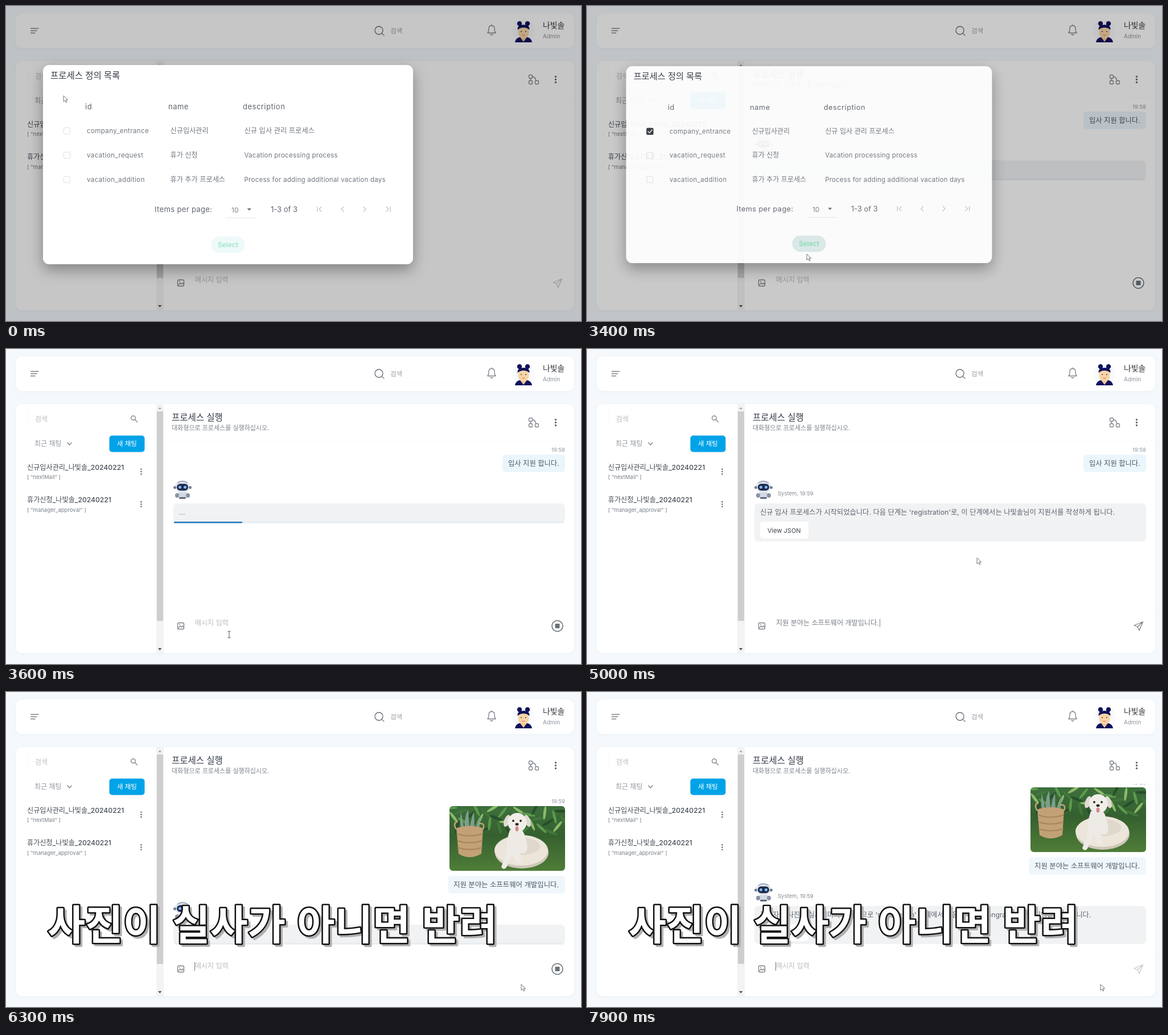
An HTML page that plays this animation: 1010x555 px, repeating every 8000 ms.

```html
<!DOCTYPE html>
<html lang="ko">
<head>
<meta charset="utf-8">
<title>Process chat</title>
<style>
html, body { margin: 0; width: 100%; height: 100%; overflow: hidden; background: #f5f9fc; }
svg { display: block; width: 1010px; height: 555px; }
text { font-family: Inter, "Noto Sans CJK KR", "Noto Sans CJK", sans-serif; white-space: pre; }
.caption { font-family: "Noto Sans CJK KR", "Noto Sans CJK", sans-serif; font-size: 72.1px; font-weight: 700; stroke-linejoin: round; }
.line { fill: none; stroke: #7b8188; stroke-width: 1.3; stroke-linecap: round; stroke-linejoin: round; }
</style>
</head>
<body>
<svg id="stage" viewBox="0 0 1010 555" xmlns="http://www.w3.org/2000/svg"></svg>
<script>
const LOOP = 8000;
const PERSON = '나빛솔';
const TYPED = '지원 분야는 소프트웨어 개발입니다.';
const TIMES = { check: 2600, select: 3300, close: 3380, reply: 4100, typing: 4300, typed: 4900,
  send: 5600, caption: 5900, reject: 7200 };

const text = (x, y, s, size, fill, extra = '') =>
  `<text x="${x}" y="${y}" font-size="${size}" fill="${fill}" ${extra}>${s}</text>`;
const rect = (x, y, w, h, r, fill, extra = '') =>
  `<rect x="${x}" y="${y}" width="${w}" height="${h}" rx="${r}" fill="${fill}" ${extra}/>`;
const circle = (x, y, r, fill, extra = '') => `<circle cx="${x}" cy="${y}" r="${r}" fill="${fill}" ${extra}/>`;
const ellipse = (x, y, rx, ry, fill, extra = '') =>
  `<ellipse cx="${x}" cy="${y}" rx="${rx}" ry="${ry}" fill="${fill}" ${extra}/>`;
const path = (d, fill, extra = '') => `<path d="${d}" fill="${fill}" ${extra}/>`;
const line = (d, extra = '') => `<path class="line" d="${d}" ${extra}/>`;
const group = (id, body, extra = '') => `<g id="${id}" ${extra}>${body}</g>`;
const dots = (x, y, gap, r) => [-1, 0, 1].map(i => circle(x, y + i * gap, r, '#666b72')).join('');
const END = 'text-anchor="end"', MEDIUM = 'font-weight="500"';

const avatar = circle(909, 44, 19.5, '#f8fafc')
  + circle(902, 31, 4.2, '#10125c') + circle(916, 31, 4.2, '#10125c')
  + path('M894 64Q895 57 902 55H916Q923 57 924 64Z', '#10125c')
  + path('M903 55H915L909 63Z', '#f3c795')
  + rect(899.5, 36, 19, 20, 8, '#f8d5a7')
  + path('M898.5 42Q898 33 909 33T919.5 42Q915 38 909 38T898.5 42Z', '#10125c')
  + circle(905, 45, .9, '#333') + circle(913, 45, .9, '#333')
  + path('M906.5 51Q909 53 911.5 51', 'none', 'stroke="#c86b55"');

const header = rect(17, 13, 981, 61, 12, '#fff', 'filter="url(#soft)"')
  + line('M43.5 39.5H57M43.5 43.5H54M43.5 47.5H51', 'stroke-width="1"')
  + circle(655, 43, 7, 'none', 'stroke="#666c74" stroke-width="1.3"') + line('M660.5 48.5L664 52')
  + text(675, 48, '검색', 11.5, '#9a9fa6') + rect(645, 59, 160, 1, 0, '#fafbfb')
  + line('M846 47.5Q848 45 848 40Q848 34.5 853 34.5T858 40Q858 45 860 47.5ZM851 50Q853 52 855 50M853 33V34')
  + avatar + text(943, 38.5, PERSON, 13.8, '#30353d', MEDIUM) + text(943, 57, 'Admin', 10, '#8d939b');

const chatItem = (y, title, step) => text(37, y, `${title}_${PERSON}_20240221`, 12.15, '#444b55', MEDIUM)
  + text(37, y + 16.5, `[ "${step}" ]`, 9.5, '#7a8189') + dots(237.5, y + 3.5, 4.2, 1.3);

const sidebar = path('M38 107V138', 'none', 'stroke="#f6f7f8"')
  + text(51, 128, '검색', 12, '#b9bdc3')
  + circle(223.5, 121.5, 3.8, 'none', 'stroke="#8a9097" stroke-width="1.5"') + line('M226.5 124.5L230.5 128.5')
  + text(50, 171, '최근 채팅', 12, '#9398a0') + line('M108 165L111.5 169L115 165')
  + rect(181.5, 152.5, 62, 29, 5, '#03a3e8', 'filter="url(#soft)"') + text(212.5, 171, '새 채팅', 11.5, '#fff', 'font-weight="500" text-anchor="middle"')
  + chatItem(212.5, '신규입사관리', 'nextMail') + chatItem(270, '휴가신청', 'manager_approval')
  + rect(264, 97, 13, 439, 0, '#f3f3f4') + rect(265, 110, 11, 369, 0, '#cecece')
  + path('M267.5 106L270.3 102.5L273 106Z', '#a5a5a5') + path('M267 527L270.2 531L273.5 527Z', '#555');

const chatFrame = text(291, 126, '프로세스 실행', 15.5, '#333b46', MEDIUM)
  + text(291, 143, '대화형으로 프로세스를 실행하십시오.', 11, '#7b828b')
  + line('M921.5 127V132M924.5 124.5Q930 125 930.5 131')
  + [[918.5, 121.5], [918.5, 131.5], [929.5, 131.5]].map(([x, y]) =>
    rect(x, y, 6, 6, 2, '#fff', 'stroke="#7b8188" stroke-width="1.3"')).join('')
  + dots(965.5, 129.5, 5, 1.7)
  + rect(278, 162, 720, 1, 0, '#f9fafb') + rect(278, 468, 720, 1, 0, '#fbfcfc')
  + rect(301.5, 482.5, 11, 11, 2, 'none', 'stroke="#7b8188" stroke-width="1.3"')
  + line('M303 491L306 488L308 490L310 488L312 490') + circle(305, 485.5, .9, '#7b8188')
  + text(332, 487, '메시지 입력', 12, '#b7bbc1', 'id="placeholder"') + text(332, 487, '', 12.1, '#777d85', 'id="typed"')
  + rect(331, 476, 1, 15, 0, '#777', 'id="caret"')
  + group('plane', line('M961 487L976.5 480.5L970 496L967 489.5ZM967 489.5L976 481'))
  + group('stop', circle(968.5, 488, 9.5, 'none', 'stroke="#6a7077" stroke-width="1.6"') + rect(964.5, 484, 8, 8, 1, '#6a7077'));

const robot = ellipse(310, 257, 9, 6.5, '#d3d9e2') + ellipse(300.5, 258, 3.5, 4, '#8993a4') + ellipse(319.5, 258, 3.5, 4, '#8993a4')
  + rect(304, 261, 12, 3, 1.5, '#5d687c')
  + ellipse(310, 242.5, 13.5, 11, '#e4e8ef') + circle(296.5, 244, 2.5, '#6f7d95') + circle(323.5, 244, 2.5, '#6f7d95')
  + rect(300, 237.5, 20, 12, 6, '#1d2b4b') + circle(305.5, 243.5, 2.5, '#86b8ff') + circle(314.5, 243.5, 2.5, '#86b8ff')
  + path('M301 236Q310 230 319 236', 'none', 'stroke="#8b99af" stroke-width="1.5"');

const answer = (id, message, size) => group(id, robot
  + group(id + 'Wait', rect(294, 272, 688, 35, 7, '#f0f2f4') + text(304, 292, '...', 12, '#777d85')
    + rect(296, 304.5, 684, 2, 1, '#e6ebf0') + rect(295, 304, 0, 3, 1, '#3989cb', `id="${id}Bar"`))
  + group(id + 'Done', text(335, 258, 'System, 19:59', 9.5, '#858b93') + rect(294, 272, 688, 67, 7, '#f0f2f4')
    + text(304, 291.5, message, size, '#5d646d') + rect(304, 304, 85, 30, 5, '#fff') + text(317, 323.5, 'View JSON', 11, '#3b4149')));

// Leaf fans around the top edge of the picture
const leaves = Array.from({ length: 36 }, (_, i) => {
  const x = 781 + i * 5.7, y = 204 + (i * 17) % 44;
  return ellipse(x, y, 12, 2.5, ['#5c9a4c', '#8dba68', '#284f2b', '#43763b'][i % 4], `transform="rotate(${i * 53} ${x} ${y})"`);
}).join('');
const photo = `<g clip-path="url(#photoClip)">` + rect(779, 201, 203, 114, 0, 'url(#grass)') + leaves
  + path('M800 248Q796 225 799 212L806 246Q804 220 812 207L814 246Q817 220 822 211L823 246Q829 225 835 216L830 248Z', '#7d9f8c')
  + path('M791 240Q814 232 838 240L835 285Q814 297 795 285Z', '#c3a177')
  + [250, 262, 274].map(y => path(`M793 ${y}Q814 ${y + 7} 837 ${y}`, 'none', 'stroke="#a98558" stroke-width="2"')).join('')
  + path('M791 242Q784 231 793 228M838 242Q842 230 831 232', 'none', 'stroke="#c3a177" stroke-width="2.5"')
  + ellipse(906, 283, 47, 28, '#cfc7b8') + ellipse(905, 279, 47, 27, '#ebe5da') + ellipse(908, 272, 30, 15, '#e0d8ca')
  + path('M885 243Q877 268 879 285L870 308Q874 315 879 309L890 284L896 300Q902 304 905 299L903 284Q918 287 915 267Q912 250 906 243Z', '#eeebe6')
  + ellipse(880, 227, 5, 11, '#dfdad2', 'transform="rotate(20 880 227)"') + ellipse(916, 227, 5, 11, '#dfdad2', 'transform="rotate(-20 916 227)"')
  + ellipse(898, 230, 16.5, 17, '#f1eeea') + circle(891, 227, 1.9, '#28231f') + circle(904, 227, 1.9, '#28231f')
  + ellipse(897.5, 233, 3, 2.3, '#28231f') + ellipse(897.5, 241, 3, 4.5, '#d48a8c') + '</g>';

const messages = group('first', text(982, 181, '19:58', 9.5, '#9398a0', END)
    + rect(872, 186, 110, 31, 6, '#ebf5fc') + text(882, 206, '입사 지원 합니다.', 12.3, '#4d5661')
    + answer('start', `신규 입사 프로세스가 시작되었습니다. 다음 단계는 'registration'로, 이 단계에서는 ${PERSON}님이 지원서를 작성하게 됩니다.`, 12.3))
  + group('second', text(982, 195.5, '19:59', 9.5, '#9398a0', END) + photo
    + rect(776, 324, 206, 31, 6, '#eff7fc') + text(786, 343.5, TYPED, 12.4, '#4d5661')
    + `<g transform="translate(0 138)">` + answer('verdict', "지원자의 사진이 실사이미지가 아니므로 'registration' 단계에서 다음 단계인 'congratulate'로 진행할 수 없습니다.", 12.1) + '</g>');

const GREY = '#70767f';
const row = (y, id, name, about, ko) => rect(101.5, y - 9.5, 11, 11, 1, '#fff', 'stroke="#dedfe1"')
  + text(142, y, id, 11.5, GREY, 'letter-spacing=".4"') + text(288.5, y, name, 12.2, GREY)
  + text(418.5, y, about, ko ? 12.3 : 11.5, GREY, ko ? '' : 'letter-spacing=".26"');
const pager = [[552, 1, 1], [591, 1, 0], [630, -1, 0], [670, -1, 1]].map(([x, dir, end]) =>
  line(`M${x + 2 * dir} 354L${x - 2 * dir} 358L${x + 2 * dir} 362` + (end ? `M${x - 5 * dir} 354V362` : ''), 'style="stroke:#bfc3c8"')).join('');

const modal = rect(65, 104, 650, 351, 11, '#fff', 'filter="url(#deep)"')
  + text(78, 127.5, '프로세스 정의 목록', 15.5, '#343a43', MEDIUM)
  + [[139, 'id'], [285, 'name'], [416, 'description']].map(([x, s]) => text(x, 181.5, s, 13, '#60666f', 'letter-spacing=".5"')).join('')
  + row(224, 'company_entrance', '신규입사관리', '신규 입사 관리 프로세스', true)
  + row(267, 'vacation_request', '휴가 신청', 'Vacation processing process')
  + row(310, 'vacation_addition', '휴가 추가 프로세스', 'Process for adding additional vacation days')
  + group('checked', rect(101, 214, 12.5, 12.5, 2, '#35393f') + line('M104 220.5L106.5 223L111 217.5', 'style="stroke:#fff"'))
  + text(261, 363, 'Items per page:', 13, '#60666f', 'letter-spacing=".35"') + text(396, 363.5, '10', 12, '#7a8088')
  + path('M423.5 356.5H431L427.2 360.5Z', '#6d737a') + rect(386, 373, 54, 1, 0, '#e7e8ea')
  + text(465, 363, '1-3 of 3', 13, '#60666f') + pager
  + rect(360, 406, 60, 29, 14.5, '#edfaf9', 'id="selectPill"') + text(372, 425, 'Select', 12, '#9adfc8', MEDIUM + ' id="selectLabel"');

const CAPTION = '사진이 실사가 아니면 반려';
const captionLayer = (shift, fill, stroke, extra = '') =>
  `<text class="caption" x="${73 + shift}" y="${435.5 + shift}" fill="${fill}" stroke="${stroke}" ${extra}>${CAPTION}</text>`;
const caption = captionLayer(4, '#b0b0b0', '#b0b0b0', 'stroke-width="4"')
  + captionLayer(0, '#fff', '#111', 'stroke-width="5" paint-order="stroke"');

document.getElementById('stage').innerHTML = `<defs>
  <filter id="soft" x="-10%" y="-30%" width="120%" height="160%"><feDropShadow dx="0" dy="1" stdDeviation="2.5" flood-color="#8aa0b4" flood-opacity=".1"/></filter>
  <filter id="deep" x="-15%" y="-20%" width="130%" height="150%"><feDropShadow dx="0" dy="10" stdDeviation="13" flood-opacity=".34"/></filter>
  <linearGradient id="grass" x2="0" y2="1"><stop stop-color="#3d6f3c"/><stop offset=".45" stop-color="#35602f"/><stop offset="1" stop-color="#4f7d38"/></linearGradient>
  <clipPath id="photoClip"><rect x="779" y="201" width="203" height="114" rx="6"/></clipPath>
  <clipPath id="chatClip"><rect x="278" y="162" width="720" height="306"/></clipPath></defs>`
  + rect(0, 0, 1010, 555, 0, '#f5f9fc') + header
  + rect(17, 97, 981, 439, 12, '#fff', 'filter="url(#soft)"') + sidebar + chatFrame
  + `<g clip-path="url(#chatClip)">${messages}</g>`
  + rect(0, 0, 1010, 555, 0, '#000', 'id="scrim"') + group('modal', modal) + group('caption', caption)
  + group('arrow', path('M0 0V10.5L2.5 8.3L4.4 12L6 11.2L4.2 7.6L7.6 7.4Z', '#fff', 'stroke="#70757b" stroke-width="1"'))
  + group('beam', line('M-2 -5.5H2M0 -5.5V5.5M-2 5.5H2', 'stroke-width="1"'));

const el = {};
document.querySelectorAll('#stage [id]').forEach(node => el[node.id] = node);
const set = (id, values) => Object.entries(values).forEach(([k, v]) => el[id].setAttribute(k, v));
const show = (id, on) => set(id, { display: on ? 'inline' : 'none' });
const clamp = v => Math.max(0, Math.min(1, v));

// time, x, y of the pointer tip
const POINTER = [[0, 101, 158], [1000, 101, 158], [2300, 118, 197], [2500, 107, 219], [2700, 107, 219],
  [3200, 387, 424], [3400, 386, 437], [3600, 392, 503], [3900, 392, 503], [4400, 685, 368], [5050, 685, 368],
  [5500, 967, 487], [5700, 967, 487], [6100, 905, 515], [6700, 905, 515], [7000, 902, 515]];

function pointerAt(t) {
  const next = POINTER.findIndex(k => k[0] > t);
  if (next < 0) return POINTER.at(-1).slice(1);
  const [a, b] = [POINTER[next - 1], POINTER[next]];
  const u = (t - a[0]) / (b[0] - a[0]), e = u * u * (3 - 2 * u);
  return [a[1] + (b[1] - a[1]) * e, a[2] + (b[2] - a[2]) * e];
}

function drawAnswer(id, done, t) {
  show(id + 'Wait', !done);
  show(id + 'Done', done);
  const u = (t - 3400 + 1450) % 1450 / 1450;
  const head = clamp(2.2 * u - .13), tail = clamp(2.2 * u - .9);
  set(id + 'Bar', { x: 295 + 686 * tail, width: 686 * (head - tail) });
}

function draw(t) {
  const T = TIMES, sent = t >= T.send, rejected = t >= T.reject;

  const closing = clamp((t - T.close) / 180);
  show('modal', closing < 1);
  set('modal', { opacity: 1 - closing ** 1.3, transform: `translate(390 279.5) scale(${1 - .1 * closing}) translate(-390 -279.5)` });
  set('scrim', { opacity: .225 * (1 - closing ** 1.3) });
  const checked = t >= T.check, hover = t >= 3150;
  show('checked', checked);
  set('selectPill', { fill: hover ? '#dcebea' : checked ? '#e2f8f2' : '#edfaf9' });
  set('selectLabel', { fill: checked ? '#7bdcaa' : '#9adfc8' });

  show('first', t >= T.select && !sent);
  show('second', sent);
  set('second', { transform: `translate(0 ${rejected ? -33 : 0})` });
  drawAnswer('start', t >= T.reply, t);
  drawAnswer('verdict', rejected, t);

  const count = sent ? 0 : Math.floor(TYPED.length * clamp((t - T.typing) / (T.typed - T.typing)));
  el.typed.textContent = count ? TYPED.slice(0, count) + '|' : '';
  show('placeholder', !count);
  show('caret', sent);
  const waiting = t >= T.select && t < T.reply || sent && !rejected;
  show('stop', waiting);
  show('plane', !waiting);
  set('plane', { opacity: count ? 1 : .42 });
  show('caption', t >= T.caption);

  const [x, y] = pointerAt(t);
  const overInput = closing === 1 && x > 325 && x < 940 && y > 470 && y < 510;
  show('beam', overInput);
  show('arrow', !overInput);
  set('beam', { transform: `translate(${x} ${y})` });
  set('arrow', { transform: `translate(${x} ${y})` });
}

const origin = performance.now();
function tick() {
  draw((performance.now() - origin) % LOOP);
  requestAnimationFrame(tick);
}
tick();
</script>
</body>
</html>
```
